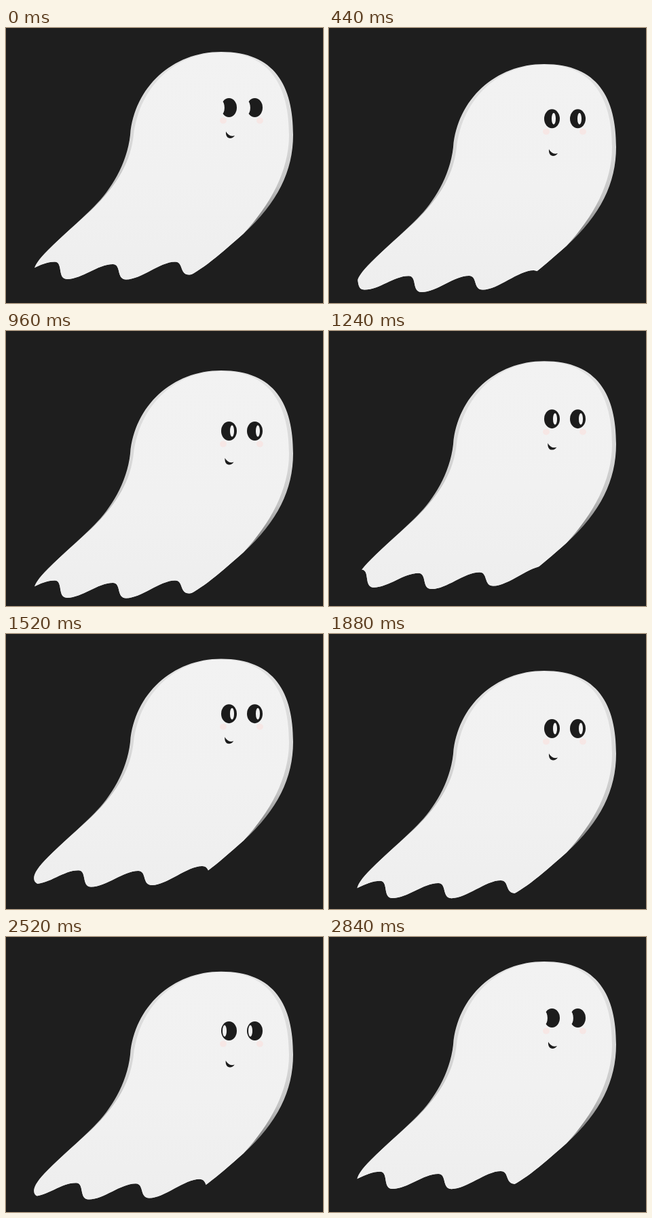
Write an HTML page with a canvas that moves like this. It is 467 px wide and 404 px high and loops after 2880 ms.

```html
<!DOCTYPE html>
<html lang="en">
<head>
<meta charset="utf-8">
<title>Floating ghost</title>
<style>
  html, body { margin: 0; width: 100%; height: 100%; overflow: hidden; background: #1e1e1e; }
  canvas { display: block; }
</style>
</head>
<body>
<canvas id="stage" width="467" height="404"></canvas>
<script>
const ctx = document.getElementById('stage').getContext('2d');
const LOOP = 2880, STEP = 40, WAVE_PERIOD = 960;
const DARK = '#1c1c1c', LIGHT = '#f2f2f2';

// Body shapes, measured from the top of the head.
const shell = new Path2D(`M317 0 C245 0 189 52 183 122 C178 166 154 203 130 227
  C108 249 82 271 62 291 C48 305 41 315 41 322 C41 330 48 332 60 333
  L60 340 L240 340 C275 332 300 311 350 267 C400 222 423 175 423 122 C423 50 396 0 317 0Z`);
const front = new Path2D(`M317 1 C250 1 197 50 188 122 C184 160 165 195 126 232
  C108 249 82 271 62 291.5 C48 305 41.5 315 41.5 322 C41.5 330 48 332 60 333
  L60 340 L240 340 C275 332 300 311 350 267 C389 225 417 175 417 122 C417 52 390 1 317 1Z`);
const smile = new Path2D('M-6 -5 C-7 7 3 7 7 1 C1 3 -3 0 -6 -5Z');

function verticalGradient(...stops) {
  const gradient = ctx.createLinearGradient(0, 0, 0, 340);
  stops.forEach(([at, color]) => gradient.addColorStop(at, color));
  return gradient;
}
const shellFill = verticalGradient([0, '#e2e2e2'], [.4, '#d8d8d8'], [.58, '#c4c4c4'], [.72, '#858585'], [.82, '#c8c8c8'], [1, '#d8d8d8']);
const frontFill = verticalGradient([0, LIGHT], [.55, '#f1f1f1'], [1, '#eeeeee']);

// Looping smooth curve through [time, value] keys, level at every turning point.
function track(...keys) {
  const n = keys.length;
  const key = i => {
    const turn = Math.floor(i / n), [t, v] = keys[i - turn * n];
    return [t + turn * LOOP, v];
  };
  const slope = (a, b) => (b[1] - a[1]) / (b[0] - a[0]);
  const tangent = i => {
    const before = slope(key(i - 1), key(i)), after = slope(key(i), key(i + 1));
    return before * after > 0 ? 2 * before * after / (before + after) : 0;
  };
  return t => {
    let i = n - 1;
    while (keys[i][0] > t) i--;
    const a = key(i), b = key(i + 1), span = b[0] - a[0], u = (t - a[0]) / span;
    const ease = u * u * (3 - 2 * u);
    return a[1] + (b[1] - a[1]) * ease
      + span * u * (1 - u) * (tangent(i) * (1 - u) - tangent(i + 1) * u);
  };
}

const bodyY = track([0, 35], [440, 53], [560, 58.5], [755, 65.5], [960, 58], [1120, 51], [1460, 35],
  [1520, 36.5], [1700, 45.5], [1880, 54], [2180, 65.5], [2520, 50.7], [2800, 37.5], [2840, 36]);
const eyeY = track([0, 117], [440, 133.3], [820, 150], [960, 147], [1500, 117], [1880, 139], [2190, 150], [2520, 138], [2840, 119]);
const mouthY = track([0, 157], [440, 183], [780, 197], [960, 191.5], [1490, 156], [1880, 180.5], [2250, 197], [2520, 186.5], [2840, 159]);
const mouthX = track([0, 330], [440, 330], [960, 328.5], [1520, 328.3], [1880, 330], [2520, 329.7], [2840, 329]);
const glintX = track([0, -11], [440, 2.5], [620, 4.5], [2200, 4.5], [2520, -6.5], [2800, -11]);

// Everything above the scalloped hem, which travels to the left.
function hem(t) {
  const x = s => 90 + 84 * s + 3 * s * s;
  const low = s => [x(s), 335 - .00045 * (x(s) - 140) ** 2];
  const high = s => [x(s), 312 - .00045 * (x(s) - 160) ** 2];
  const shift = t % WAVE_PERIOD / WAVE_PERIOD;
  const path = new Path2D();
  path.moveTo(-200, -10);
  path.lineTo(...low(-2 - shift));
  for (let s = -2 - shift; s < 4; s++) {
    const [ax, ay] = low(s), [bx, by] = high(s + .78), [cx, cy] = low(s + 1);
    path.bezierCurveTo(ax + 22, ay, bx - 22, by, bx, by);
    path.bezierCurveTo(bx + 13, by, cx - 15, cy, cx, cy);
  }
  path.lineTo(700, -10);
  path.closePath();
  return path;
}

function ellipse(x, y, rx, ry, color) {
  ctx.fillStyle = color;
  ctx.beginPath();
  ctx.ellipse(x, y, rx, ry, 0, 0, 2 * Math.PI);
  ctx.fill();
}

function drawBody(t) {
  ctx.save();
  ctx.translate(0, bodyY(t));
  ctx.clip(hem(t));
  ctx.fillStyle = shellFill;
  ctx.fill(shell);
  ctx.fillStyle = frontFill;
  ctx.fill(front);
  ctx.restore();
}

function drawFace(t) {
  const y = eyeY(t), glint = glintX(t);
  const glintSize = 3 + Math.max(0, -glint - 7) * .35;
  for (const x of [320, 374]) ellipse(x, y + 19, 5, 4.5, 'rgba(255, 215, 210, .4)');
  for (const x of [328.5, 366.5]) {
    ellipse(x, y, 11.5, 14, DARK);
    ellipse(x + glint, y, glintSize, glintSize + 5.5, LIGHT);
  }
  ctx.save();
  ctx.translate(mouthX(t), mouthY(t));
  ctx.fillStyle = DARK;
  ctx.fill(smile);
  ctx.restore();
}

function draw() {
  const t = Math.floor(performance.now() % LOOP / STEP) * STEP;
  ctx.fillStyle = '#1e1e1e';
  ctx.fillRect(0, 0, 467, 404);
  drawBody(t);
  drawFace(t);
  requestAnimationFrame(draw);
}
draw();
</script>
</body>
</html>
```
